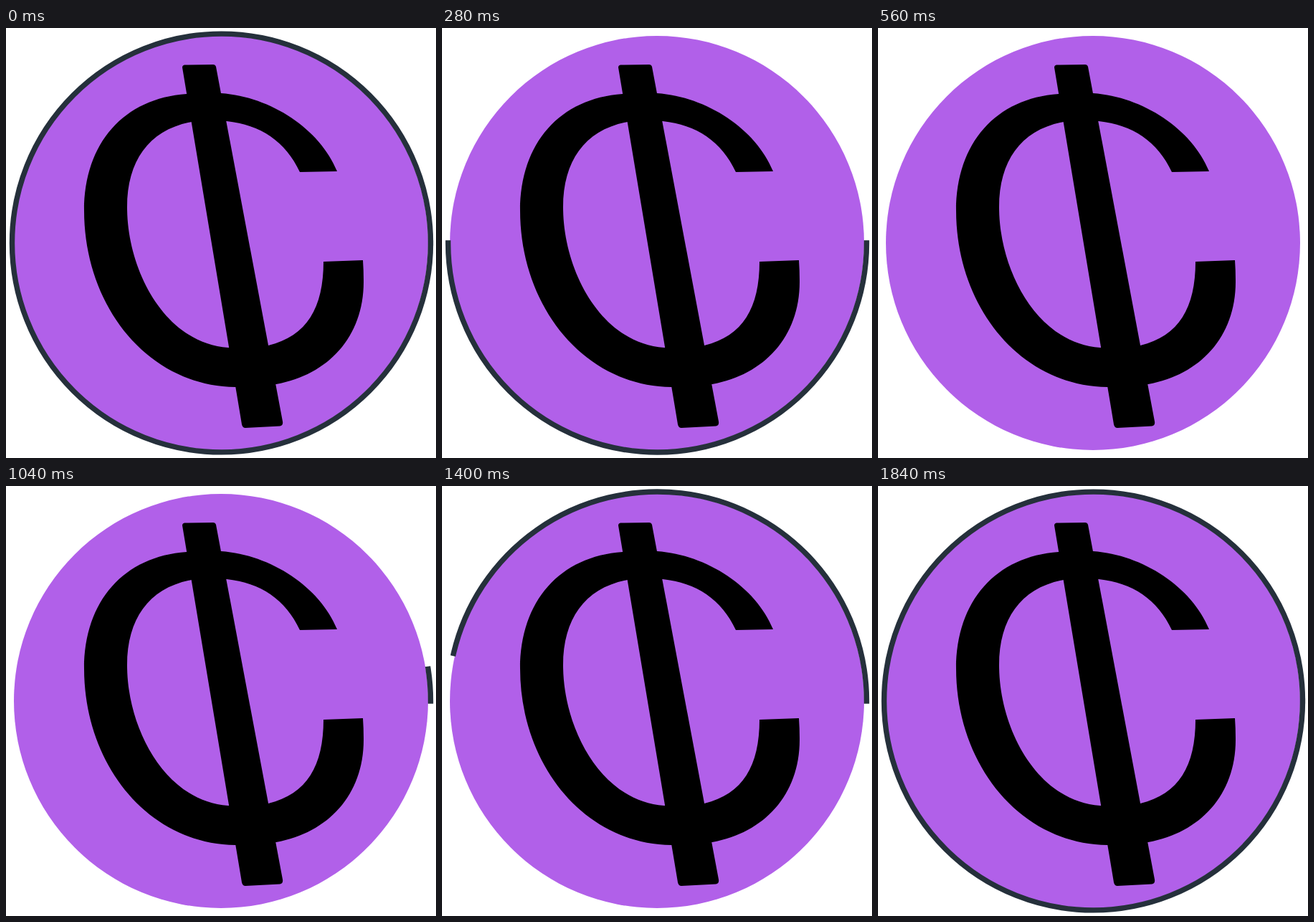
These frames come from a looping animation (600 by 600 pixels, 2.4 s). An HTML page:

```html
<!DOCTYPE html>
<html lang="en">
<head>
<meta charset="utf-8">
<title>Cent coin</title>
<style>
html, body { margin: 0; width: 100%; height: 100%; overflow: hidden; background: #fff; }
svg { display: block; width: 100%; height: 100%; }
#ring { fill: none; stroke: #25303b; stroke-width: 7.4; stroke-linecap: square; }
</style>
</head>
<body>
<svg viewBox="0 0 600 600">
  <circle cx="300" cy="300" r="289" fill="#b160e9"/>
  <path id="ring"/>
  <path d="M462 200 C438 141 370 96 300 91 L252 92 C165 98 109 160 109 255
           C109 385 195 499 320 501 L377 497 C450 484 500 430 499 352
           Q499 338 498 324 L443 326 C443 390 420 430 366 443 L310 446
           C222 440 169 338 169 250 C169 185 200 142 259 131 L308 130
           C355 135 390 158 410 201 Z"/>
  <path d="M246 55 Q246 52 249 51.5 L289 51 Q292 51 293 54 L386 549
           Q387 555 382 555.5 L334 558 Q330 558 329 553 Z"/>
</svg>
<script>
const LOOP = 2400, STEP = 40;
const ERASE_END = 560, DRAW_START = 1020, DRAW_END = 1840;
const CX = 300.5, CY = 300, R = 292;
const ring = document.getElementById('ring');

// Angles in degrees, counterclockwise from three o'clock
function point(deg) {
  const a = deg * Math.PI / 180;
  return `${CX + R * Math.cos(a)} ${CY - R * Math.sin(a)}`;
}

function arc(from, to) {
  if (to - from < 0.01) return '';
  const mid = (from + to) / 2;
  const seg = deg => `A${R} ${R} 0 0 0 ${point(deg)}`;
  return `M${point(from)}${seg(mid)}${seg(to)}`;
}

function span(t) {
  if (t < ERASE_END) return [360 * t / ERASE_END, 360];
  if (t < DRAW_START) return [0, 0];
  return [0, 360 * Math.min(1, (t - DRAW_START) / (DRAW_END - DRAW_START))];
}

let shown = -1;
function show(ms) {
  const t = Math.floor((ms % LOOP) / STEP) * STEP;
  if (t === shown) return;
  shown = t;
  ring.setAttribute('d', arc(...span(t)));
}

const start = performance.now();
function tick() {
  show(performance.now() - start);
  requestAnimationFrame(tick);
}
tick();
</script>
</body>
</html>
```
